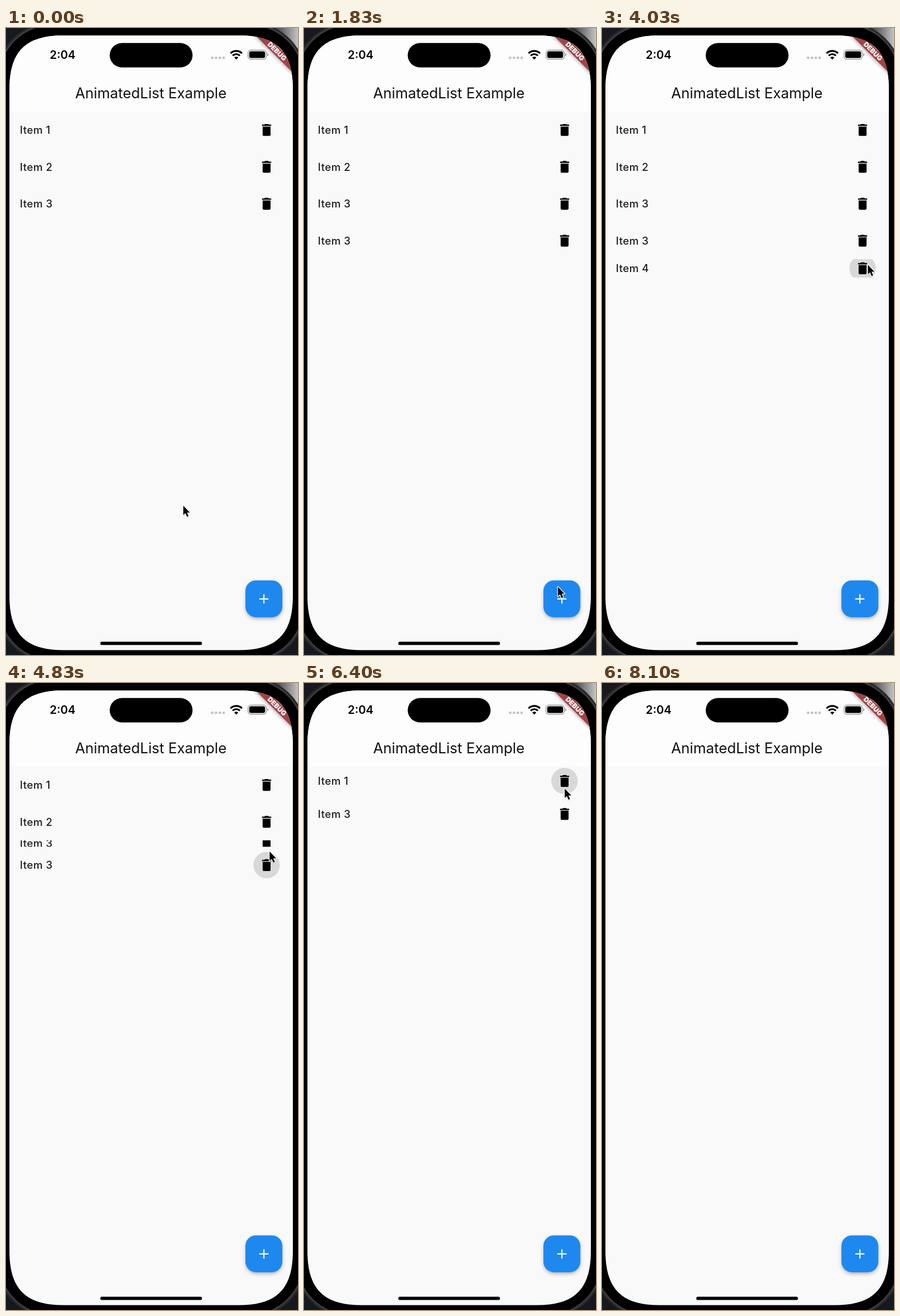
An HTML page for the animation above (8960 ms loop, 511 by 1097 pixels).

```html
<!DOCTYPE html>
<html lang="en">
<head>
<meta charset="utf-8">
<title>AnimatedList Example</title>
<style>
  html, body { margin: 0; width: 100%; height: 100%; overflow: hidden; background: #000; }
  #stage { display: block; width: 100vw; height: 100vh; }
  text { font-family: Inter, Roboto, sans-serif; }
  .item { font-size: 18.46px; font-weight: 500; letter-spacing: .38px; fill: #1d1d1f; }
</style>
</head>
<body>
<svg id="stage" viewBox="0 0 511 1097">
  <defs>
    <clipPath id="screen"><path id="screenPath"/></clipPath>
    <clipPath id="fabClip"><rect x="419" y="966.4" width="64.6" height="64.6" rx="18.5"/></clipPath>
    <filter id="blur" x="-50%" y="-50%" width="200%" height="200%"><feGaussianBlur stdDeviation="3.5"/></filter>
    <filter id="soft" x="-50%" y="-50%" width="200%" height="200%"><feGaussianBlur stdDeviation="1.2"/></filter>
    <linearGradient id="glow" x1="0" x2="1">
      <stop offset=".9" stop-color="#17191e"/>
      <stop offset="1" stop-color="#c4c4c6"/>
    </linearGradient>
    <path id="trash" transform="translate(442.2 -13.85) scale(1.154)"
      d="M6 19c0 1.1.9 2 2 2h8c1.1 0 2-.9 2-2V7H6v12zM19 4h-3.5l-1-1h-5l-1 1H5v2h14V4z"/>
    <path id="arrow" d="M.3 .8V17.2L4 13.7L6.8 20.2L9.5 19L6.8 12.7H11.8Z"/>
  </defs>

  <rect width="511" height="1097" fill="#15181d"/>
  <rect width="511" height="60" fill="url(#glow)"/>
  <rect x="-15" y="-8" width="538" height="1116" rx="98" stroke="#29292b" stroke-width="6"/>
  <rect x="-14" y="-7" width="536" height="1114" rx="97" fill="none" stroke="#5c5c5e"/>

  <g clip-path="url(#screen)">
    <rect width="511" height="1097" fill="#f9f9f9"/>
    <g id="list"></g>
    <rect width="511" height="146" fill="#fdfdfd"/>
    <text x="253.5" y="122.8" text-anchor="middle" font-size="25.4" fill="#111">AnimatedList Example</text>

    <rect x="420" y="970" width="62.6" height="63" rx="18" fill-opacity=".36" filter="url(#blur)"/>
    <rect x="419" y="966.4" width="64.6" height="64.6" rx="18.5" fill="#1e88ef"/>
    <circle id="splash" cx="448" cy="983" fill="#fff" clip-path="url(#fabClip)"/>
    <path d="M443.2 998.8h16.2M451.3 990.7v16.2" stroke="#f4f9ff" stroke-width="2.2"/>

    <text x="76.5" y="54.4" font-size="19.9" font-weight="600">2:04</text>
    <rect x="181.5" y="26.3" width="145" height="42.6" rx="21.3"/>
    <g fill="#c5c5c7">
      <circle cx="360.8" cy="52.2" r="2.4"/><circle cx="367.5" cy="52.2" r="2.4"/>
      <circle cx="374.2" cy="52.2" r="2.4"/><circle cx="380.9" cy="52.2" r="2.4"/>
    </g>
    <path d="M393 44.3a14.3 14.3 0 0 1 20 0M396.7 48.3a9 9 0 0 1 12.6 0" fill="none" stroke="#000" stroke-width="3.2"/>
    <path d="M403 55.2L399.5 51.6a5 5 0 0 1 7 0Z"/>
    <rect x="423.5" y="38.7" width="32" height="16" rx="5" fill="none" stroke="#8e8e90" stroke-width="1.2"/>
    <rect x="425.6" y="40.8" width="27.8" height="11.8" rx="3.3"/>
    <path d="M457.2 44v5.4q1.9-.8 1.9-2.7t-1.9-2.7z" fill="#8e8e90"/>

    <g transform="translate(502 13) rotate(45)">
      <rect x="-50" y="32.3" width="100" height="13.9" fill-opacity=".5" filter="url(#blur)"/>
      <rect x="-50" y="32.3" width="100" height="13.9" fill="#a54143"/>
      <text x="0" y="43.4" text-anchor="middle" font-size="11.8" font-weight="900" fill="#fff">DEBUG</text>
    </g>
    <rect x="165" y="1073.8" width="178" height="5.8" rx="2.9"/>
  </g>

  <g id="cursor">
    <use href="#arrow" y="1.5" fill-opacity=".4" filter="url(#soft)"/>
    <use href="#arrow" stroke="#fff" stroke-width="2.4" stroke-linejoin="round"/>
    <use href="#arrow"/>
  </g>
</svg>
<script>
const LOOP = 8960, ROW = 64.6, TOP = 146, SIZE_MS = 300;
const $ = id => document.getElementById(id);
const ramp = (t, start, ms) => Math.min(1, Math.max(0, (t - start) / ms));

// Display order: label, insert time, remove time
const rows = [
  ['Item 1', -SIZE_MS, 6337],
  ['Item 2', -SIZE_MS, 5550],
  ['Item 3', -SIZE_MS, 4583],
  ['Item 3', 1500, 7050],
  ['Item 4', 2060, 3880]
].map(([label, added, removed]) => ({ label, added, removed }));

// Row, press time, release time
const taps = [[4, 3700, 3880], [3, 4570, 4583], [1, 5530, 5550], [0, 6230, 6337], [3, 6970, 7050]];
const fabTaps = [1370, 1930];

// Time, x, y
const path = [
  [0, 310, 835], [30, 310, 835], [900, 376, 905], [1230, 444, 977],
  [2230, 444, 977], [2670, 466, 648], [3170, 478, 466], [3530, 465, 436],
  [3880, 465, 436], [4030, 465, 414], [4430, 461, 294], [4850, 461, 294],
  [5430, 458, 232], [5850, 458, 232], [6250, 456, 184], [7450, 456, 184],
  [7850, 330, 100], [8100, 104, -28], [LOOP, 104, -28]
];

function screenShape(l, t, r, b, e, k) {
  return `M${l + e} ${t}H${r - e}C${r - k} ${t} ${r} ${t + k} ${r} ${t + e}V${b - e}` +
    `C${r} ${b - k} ${r - k} ${b} ${r - e} ${b}H${l + e}C${l + k} ${b} ${l} ${b - k} ${l} ${b - e}` +
    `V${t + e}C${l} ${t + k} ${l + k} ${t} ${l + e} ${t}Z`;
}
$('screenPath').setAttribute('d', screenShape(6, 13, 502, 1088.5, 95, 28));

$('list').innerHTML = rows.map(r => `<svg width="511" overflow="hidden"><g>
  <circle cx="456" r="23.1"/><text class="item" x="24.3" y="6.6">${r.label}</text>
  <use href="#trash"/></g></svg>`).join('');
rows.forEach((r, i) => {
  r.box = $('list').children[i];
  r.body = r.box.firstElementChild;
  r.ink = r.body.querySelector('circle');
});

// Monotone cubic interpolation, so the pointer rests without overshoot
function slope(i, a) {
  if (i < 1 || i > path.length - 2) return 0;
  const d = j => (path[j + 1][a] - path[j][a]) / (path[j + 1][0] - path[j][0]);
  const p = d(i - 1), q = d(i);
  return p * q > 0 ? 2 * p * q / (p + q) : 0;
}
function pointer(t, a) {
  let i = 0;
  while (i < path.length - 2 && t >= path[i + 1][0]) i++;
  const p = path[i], q = path[i + 1], ms = q[0] - p[0], u = (t - p[0]) / ms, v = 1 - u;
  return p[a] * (1 + 2 * u) * v * v + q[a] * (1 + 2 * v) * u * u +
    ms * u * v * (slope(i, a) * v - slope(i + 1, a) * u);
}

function inkOpacity(t, row) {
  return taps.reduce((sum, [r, press, release]) => r === row
    ? sum + .135 * ramp(t, press, 150) * (1 - ramp(t, release + 260, 230)) : sum, 0);
}

function draw(t) {
  let y = TOP;
  rows.forEach((r, i) => {
    const h = ROW * ramp(t, r.added, SIZE_MS) * (1 - ramp(t, r.removed, SIZE_MS));
    r.box.style.display = h > 0 ? '' : 'none';
    r.box.setAttribute('y', y);
    r.box.setAttribute('height', h);
    r.body.setAttribute('transform', `translate(0 ${h / 2})`);
    r.ink.setAttribute('fill-opacity', inkOpacity(t, i));
    y += h;
  });
  const start = fabTaps.filter(s => s <= t).pop() ?? -LOOP;
  $('splash').setAttribute('r', 10 + 55 * ramp(t, start, 225));
  $('splash').setAttribute('fill-opacity', .1 * ramp(t, start, 75) * (1 - ramp(t, start + 200, 200)));
  $('cursor').setAttribute('transform', `translate(${pointer(t, 1)} ${pointer(t, 2)})`);
}

const begin = performance.now();
function tick() {
  draw((performance.now() - begin) % LOOP);
  requestAnimationFrame(tick);
}
tick();
</script>
</body>
</html>
```
